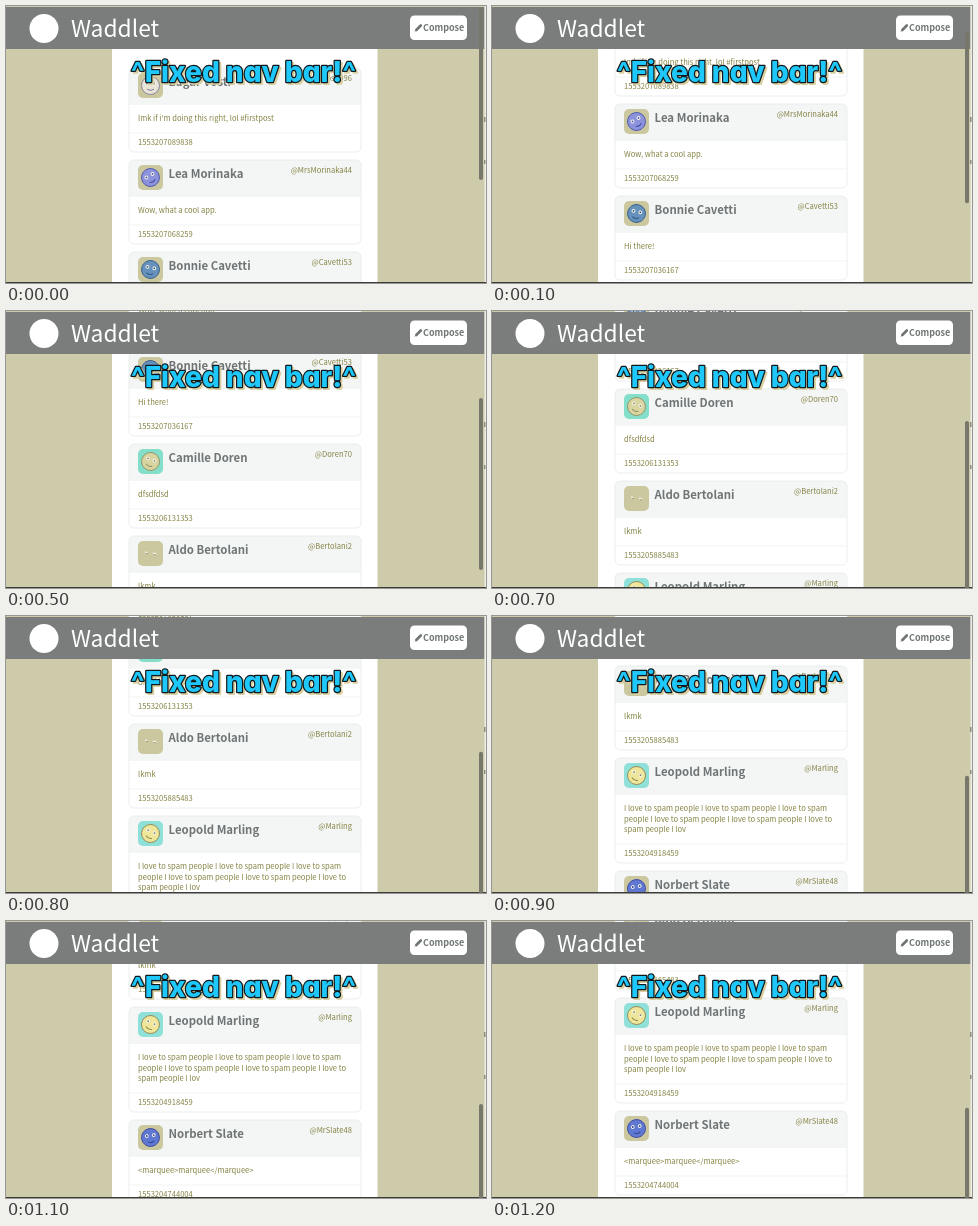
Recreate the animation shown at these times as an HTML page. Size 480 by 277 pixels, loop 1300 ms.

```html
<!DOCTYPE html>
<html lang="en">
<head>
<meta charset="utf-8">
<title>Scrolling feed</title>
<style>
  html, body { margin: 0; width: 100%; height: 100%; overflow: hidden; background: #cdcbaa; }
  svg { display: block; width: 480px; height: 277px; }
  text { font-family: "Noto Sans CJK JP", "Noto Sans CJK SC", "Noto Sans", sans-serif; white-space: pre; }
  .small { font-size: 7.6px; fill: #858344; }
  .name { font-size: 11.4px; font-weight: 700; fill: #6f7474; }
  .end { text-anchor: end; }
  .brand { font-size: 22.8px; fill: #fff; }
  .button { font-size: 9px; font-weight: 700; fill: #6f7474; }
  .banner { font: 800 28px Inter, sans-serif; font-feature-settings: "cv11"; text-anchor: middle;
            paint-order: stroke; stroke-linejoin: round; }
</style>
</head>
<body>
<svg id="stage" viewBox="0 0 480 277"></svg>
<script>
(() => {
const stage = document.getElementById('stage');

function add(parent, tag, attrs, text) {
  const el = document.createElementNS('http://www.w3.org/2000/svg', tag);
  for (const key in attrs) el.setAttribute(key, attrs[key]);
  if (text) el.textContent = text;
  parent.append(el);
  return el;
}
const box = (p, x, y, width, height, fill, rx = 0, more = {}) =>
  add(p, 'rect', { x, y, width, height, fill, rx, ...more });
const dot = (p, cx, cy, r, fill, more = {}) => add(p, 'circle', { cx, cy, r, fill, ...more });
const line = (p, d, stroke, width = 1) =>
  add(p, 'path', { d, stroke, 'stroke-width': width, fill: 'none', 'stroke-linecap': 'round' });
const label = (p, x, y, cls, text) => add(p, 'text', { x, y, class: cls }, text);

const TAN = '#cbc8a0';
const spam = 'I love to spam people ';
const posts = [
  { name: 'Edgar Vosti', handle: '@Vosti096', id: '1553207089838', back: TAN, face: '#e9e5d6', ink: '#77729a', tilt: 0,
    lines: ["lmk if i'm doing this right, lol #firstpost"] },
  { name: 'Lea Morinaka', handle: '@MrsMorinaka44', id: '1553207068259', back: TAN, face: '#8c93dc', ink: '#4650a8', tilt: -30,
    lines: ['Wow, what a cool app.'] },
  { name: 'Bonnie Cavetti', handle: '@Cavetti53', id: '1553207036167', back: TAN, face: '#6791bd', ink: '#2f5680', tilt: 12,
    lines: ['Hi there!'] },
  { name: 'Camille Doren', handle: '@Doren70', id: '1553206131353', back: '#84dfca', face: '#d8d5a0', ink: '#8c8c60', tilt: 20,
    lines: ['dfsdfdsd'] },
  { name: 'Aldo Bertolani', handle: '@Bertolani2', id: '1553205885483', back: TAN, face: '', ink: '#8f8c78', tilt: 15,
    lines: ['lkmk'] },
  { name: 'Leopold Marling', handle: '@Marling', id: '1553204918459', back: '#8fe0d8', face: '#f0e69a', ink: '#8a8450', tilt: 25,
    lines: [spam + spam + 'I love to spam', 'people ' + spam + spam + 'I love to', 'spam people I lov'] },
  { name: 'Norbert Slate', handle: '@MrSlate48', id: '1553204744004', back: TAN, face: '#5f78d2', ink: '#344296', tilt: -8,
    lines: ['<marquee>marquee</marquee>'] }
];

function avatar(p, x, y, post) {
  box(p, x, y, 25, 25, post.back, 5);
  const g = add(p, 'g', { transform: `translate(${x + 12.5} ${y + 12.5}) rotate(${post.tilt})` });
  if (!post.face) {
    line(g, 'M-5 0h1M3 -1h2', '#f3f1e4', 1.6);
    line(g, 'M-4 1h1M4 0h1', post.ink, 0.8);
    return;
  }
  dot(g, 0, 0, 9, post.face, { stroke: post.ink, 'stroke-width': 0.8 });
  for (const side of [-3.5, 3.5]) {
    dot(g, side, -2, 1.9, '#f4f3ea');
    dot(g, side, -2, 0.9, post.ink);
  }
  line(g, 'M-3 4q3 2 6 0', post.ink);
}

// Draws one post and returns the place of the next
function card(p, y, post) {
  const h = 84 + (post.lines.length - 1) * 10.5;
  box(p, 123, y, 232, h, '#fff', 5);
  add(p, 'path', { d: `M123 ${y + 37}v-32q0 -5 5 -5h222q5 0 5 5v32z`, fill: '#f4f6f6' });
  box(p, 123, y, 232, h, 'none', 5, { stroke: '#e9ecec', 'stroke-width': 0.9 });
  line(p, `M123 ${y + h - 19}h232`, '#eff0f0', 0.8);
  avatar(p, 132, y + 5, post);
  label(p, 162.5, y + 17.5, 'name', post.name);
  label(p, 346, y + 13, 'small end', post.handle);
  post.lines.forEach((text, i) => label(p, 132, y + 53 + i * 10.5, 'small', text));
  label(p, 132, y + h - 7, 'small', post.id);
  return y + h + 8;
}

// Page
box(stage, 0, 0, 480, 277, '#cdcbaa');
box(stage, 106, 43, 265.5, 234, '#fff');
const feed = add(stage, 'g', {});
posts.reduce((y, post) => card(feed, y, post), 62);

// Fixed bar
box(stage, 0, 1, 478.5, 42, '#7b7d7d');
dot(stage, 38, 22.5, 14.5, '#fff');
label(stage, 65, 30.5, 'brand', 'Waddlet');
box(stage, 404, 9.5, 57, 24.5, '#fff', 4.5);
line(stage, 'M410.3 24L414.8 19.5', '#6f7474', 2.6);
line(stage, 'M409.2 25.2l.4 -.4', '#6f7474', 1);
label(stage, 417, 24.8, 'button', 'Compose');

// Window edge and scroll thumb
box(stage, 478.5, 0, 1.5, 277, '#eeeee6');
box(stage, 478, 111, 1.5, 5, '#8b8b80');
box(stage, 478, 154, 1.5, 4, '#8b8b80');
box(stage, 0, 276, 480, 1, '#3c3c38');
const thumb = box(stage, 473, 2, 4, 172, '#77776c', 2);

// Banner
const banner = (dx, fill, stroke, width) =>
  add(stage, 'text', { x: 237.5 + dx, y: 75.5 + dx, class: 'banner', fill, stroke, 'stroke-width': width }, '^Fixed nav bar!^');
banner(2, '#d9cfa0', '#d9cfa0', 2);
banner(0, '#1fc8fa', '#10181c', 2.4);

// Two flicks: [step, offset, speed per step]
const keys = [[0, 0, 50], [3, 161, 36], [5, 205, 15], [7, 260, 55], [9, 380, 46], [10, 417, 26], [12, 445, 6]];

function offsetAt(step) {
  let i = 0;
  while (i < keys.length - 2 && step >= keys[i + 1][0]) i++;
  const [s0, y0, v0] = keys[i], [s1, y1, v1] = keys[i + 1];
  const d = s1 - s0, u = (step - s0) / d, w = 1 - u;
  return y0 * w * w * (1 + 2 * u) + y1 * u * u * (3 - 2 * u) + d * u * w * (v0 * w - v1 * u);
}

const start = performance.now();
function draw() {
  const step = Math.floor(((performance.now() - start) % 1300) / 100);
  const y = offsetAt(step);
  feed.setAttribute('transform', `translate(0 ${-Math.round(y)})`);
  thumb.setAttribute('y', 2 + y * 0.415);
  requestAnimationFrame(draw);
}
draw();
})();
</script>
</body>
</html>
```
